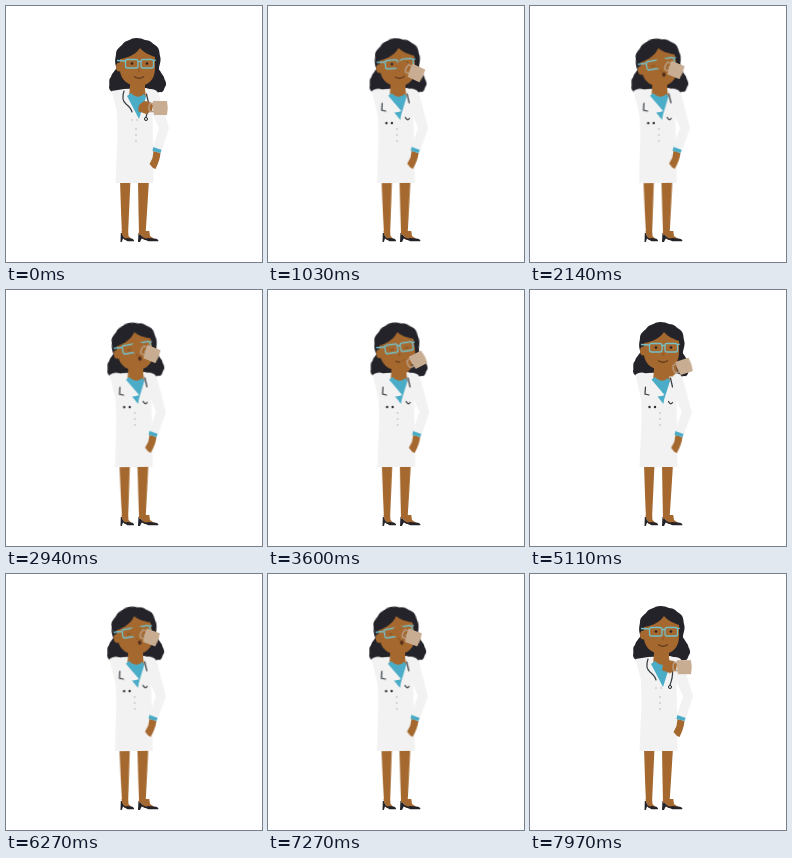
These frames come from a looping animation (256x256 px, 8 s). An HTML page:

```html
<!DOCTYPE html>
<html lang="en">
<head>
<meta charset="utf-8">
<title>Doctor drinking coffee</title>
<style>
  html, body { margin: 0; width: 100%; height: 100%; overflow: hidden; background: #fff; }
  svg { display: block; width: 100vw; height: 100vh; }
  .coat { fill: #f2f2f2; }
  .skin { fill: #a5682e; }
  .hair { fill: #242329; }
  .blue { fill: #4bacc8; }
  .line { fill: none; stroke: #343a40; stroke-width: 1.2; stroke-linecap: round; }
  .glasses { fill: none; stroke: #74bfc8; stroke-width: 1.3; }

  #body, #head, #arm, #mug, #eyes, #lids, #smile, #sip, #low, #high {
    animation: 8s ease-in-out infinite;
  }
  #body { transform-origin: 131px 222px; animation-name: sway; }
  #head { transform-origin: 133px 64px; animation-name: nod; }
  #arm { transform-origin: 148px 88px; animation-name: swing; }
  #mug { transform-origin: 154px 102px; animation-name: lift; }
  #eyes, #lids, #smile, #sip, #low, #high { animation-timing-function: step-end; }
  #eyes { animation-name: look; }
  #lids { animation-name: blink; }
  #smile { animation-name: smile; }
  #sip { animation-name: sip; }
  #low { animation-name: low; }
  #high { animation-name: high; }

  @keyframes sway {
    0%, 51%, 64%, 99.6%, 100% { transform: rotate(0deg); }
    13%, 21% { transform: rotate(-.6deg); }
    27%, 41% { transform: rotate(-.7deg); }
    45% { transform: rotate(-.2deg); }
    72%, 92% { transform: rotate(-.75deg); }
  }
  @keyframes nod {
    0%, 8%, 51%, 64%, 97%, 100% { transform: rotate(0deg); }
    13% { transform: rotate(-4deg); }
    20%, 41% { transform: rotate(-9deg); }
    45% { transform: translateX(-1px) rotate(-8deg); }
    72%, 91% { transform: rotate(-9deg); }
  }
  @keyframes swing {
    0%, 99.6%, 100% { transform: rotate(0deg); }
    13%, 41% { transform: rotate(3deg); }
    45%, 64% { transform: rotate(2deg); }
    72%, 92% { transform: rotate(3deg); }
  }
  @keyframes lift {
    0%, 100% { transform: translate(0, 0); }
    10% { transform: translate(0, -27px) rotate(12deg); }
    13% { transform: translate(-6px, -35px) rotate(25deg); }
    20%, 41% { transform: translate(-8.5px, -38px) rotate(22deg); }
    45% { transform: translate(-4px, -32px) rotate(-27deg); }
    51%, 64% { transform: translate(0, -25.5px) rotate(-18deg); }
    72%, 92% { transform: translate(-9px, -38.5px) rotate(20deg); }
    99.6% { transform: translate(0, -9px); }
  }
  @keyframes look { 0%, 49%, 95% { opacity: 1; } 18%, 70% { opacity: 0; } }
  @keyframes blink { 0%, 49%, 95% { opacity: 0; } 18%, 70% { opacity: 1; } }
  @keyframes smile { 0%, 43%, 95% { opacity: 1; } 16%, 70% { opacity: 0; } }
  @keyframes sip { 0%, 43%, 95% { opacity: 0; } 16%, 70% { opacity: 1; } }
  @keyframes low { 0%, 97% { opacity: 1; } 7% { opacity: 0; } }
  @keyframes high { 0%, 97% { opacity: 0; } 7% { opacity: 1; } }
</style>
</head>
<body>
<svg viewBox="0 0 256 256">
  <defs>
    <g id="shoe">
      <path class="skin" d="M1 -11H7.500L8 -6 12 -2 4 -2Z"/>
      <path class="hair" d="M0 0L.3 -9Q1.500 -10 2.500 -6 4 -2.500 7 -4L12 -3.200Q14 -2 13.500 -.7H7L2.500 -3.500 1.300 0Z"/>
    </g>
  </defs>
  <use href="#shoe" x="114.500" y="236"/>
  <use href="#shoe" transform="translate(132 236) scale(1.5 1)"/>

  <g id="body">
    <path class="skin" d="M114 174H124.500L123 207 122 229H116L115 205ZM132 174H143L141 206 139.500 229H133L132.500 205Z"/>
    <path class="hair" d="M112 60C109 65 106 67 105 71 102 73 104 78 103 81 103 85 107 86 109 87 112 91 118 90 120 87L145 86C148 89 152 86 154 86 158 87 158 82 159 81 162 77 158 74 158 71 155 67 155 65 151 62Z"/>
    <path class="coat" d="M118 83L105.500 85 111 106 111.500 130 109.500 177H147.500L146.500 110 147 84 140 82Z"/>
    <path class="skin" d="M124.500 74H139V84L140 91H123Z"/>
    <path class="blue" d="M121 90L125 87Q132 94 138 88L140 91 133 113Z"/>
    <g id="arm">
      <path class="skin" d="M147.500 145L154.500 147Q154 154 149.500 163L147 162 143.500 158 146.500 152Z"/>
      <path class="blue" d="M147.500 140L156 143 154.500 147 146.500 145Z"/>
      <path class="coat" d="M143 83Q151 82 153 89L163 122 156 144 147 141 153 122 145 105Z"/>
    </g>
    <path class="line" d="M140.500 88L142.500 97"/>
    <g fill="#c9c9c9">
      <circle cx="130" cy="123" r=".9"/><circle cx="130" cy="129" r=".9"/><circle cx="130" cy="135" r=".9"/>
    </g>
    <g id="low">
      <path class="line" d="M118 85Q115 94 120 98T126 106M142.500 97Q143 103 140 111"/>
      <circle cx="140" cy="113" r="1.600" fill="#ccc" stroke="#343a40"/>
      <circle cx="126" cy="114" r=".8" fill="#bbb"/><circle cx="131" cy="114" r=".8" fill="#bbb"/>
    </g>
    <g id="high">
      <path class="coat" d="M105.500 84.500Q113 80 118.500 86L134.500 105 129 107 131 114 111 109Z"/>
      <path class="blue" d="M127.500 106.500L133.500 106V114Z"/>
      <path class="line" d="M115.500 97L115 104 119 105M138.500 111.500Q140.500 115.500 142.500 112.500" stroke-width=".9"/>
      <circle cx="119.500" cy="117" r="1.200" fill="#2b2b30"/><circle cx="125" cy="117" r="1.200" fill="#2b2b30"/>
    </g>

    <g id="head">
      <path class="hair" d="M112 64C107 57 110 51 110 48 110 43 114 41 116 39 119 34 123 35 125 33 130 31 135 32 139 34 144 34 146 37 149 39 154 42 153 46 154 50 156 56 152 60 153 66L146 74H117Z"/>
      <path class="skin" d="M114 53C123 52 131 47 134 42 138 47 144 49 149 51V62C149 74 142 80 132 80 121 80 115 73 114 65Z"/>
      <ellipse class="skin" cx="113.500" cy="61" rx="3.500" ry="4.500"/>
      <path class="glasses" d="M111 54.500L119.500 55M132 56Q133.500 55 135 56M147 55L150 54"/>
      <rect class="glasses" x="119.500" y="53.500" width="12.500" height="8.500" rx="2"/>
      <rect class="glasses" x="135" y="53.500" width="12.500" height="8.500" rx="2"/>
      <g id="eyes" fill="#30231e"><circle cx="126" cy="57.500" r="1.300"/><circle cx="141" cy="57.500" r="1.300"/></g>
      <path id="lids" d="M124 58.500Q126 59.500 128 58.500M139 58.500Q141 59.500 143 58.500" fill="none" stroke="#7b4a20" stroke-width=".8"/>
      <path d="M133 63.500Q134 65.500 132 65.500" fill="none" stroke="#85501f" stroke-width=".8"/>
      <path id="smile" d="M128 70.500Q133 74 138 70.500" fill="none" stroke="#4a2a18" stroke-width="1"/>
      <ellipse id="sip" cx="135" cy="69" rx="1.800" ry="2.200" fill="#55301c"/>
    </g>
  </g>

  <g id="mug">
    <path class="skin" d="M133 99L138 95 144 96 147 99 146 105 140 108 132 105Z"/>
    <path d="M148 97.500H144Q142 102 144 105.500H148" fill="none" stroke="#b79a7f" stroke-width="1.600"/>
    <path d="M147 95H161Q162.500 102 161 109H148Q146.500 102 147 95Z" fill="#c8ad92"/>
  </g>
</svg>
</body>
</html>
```
